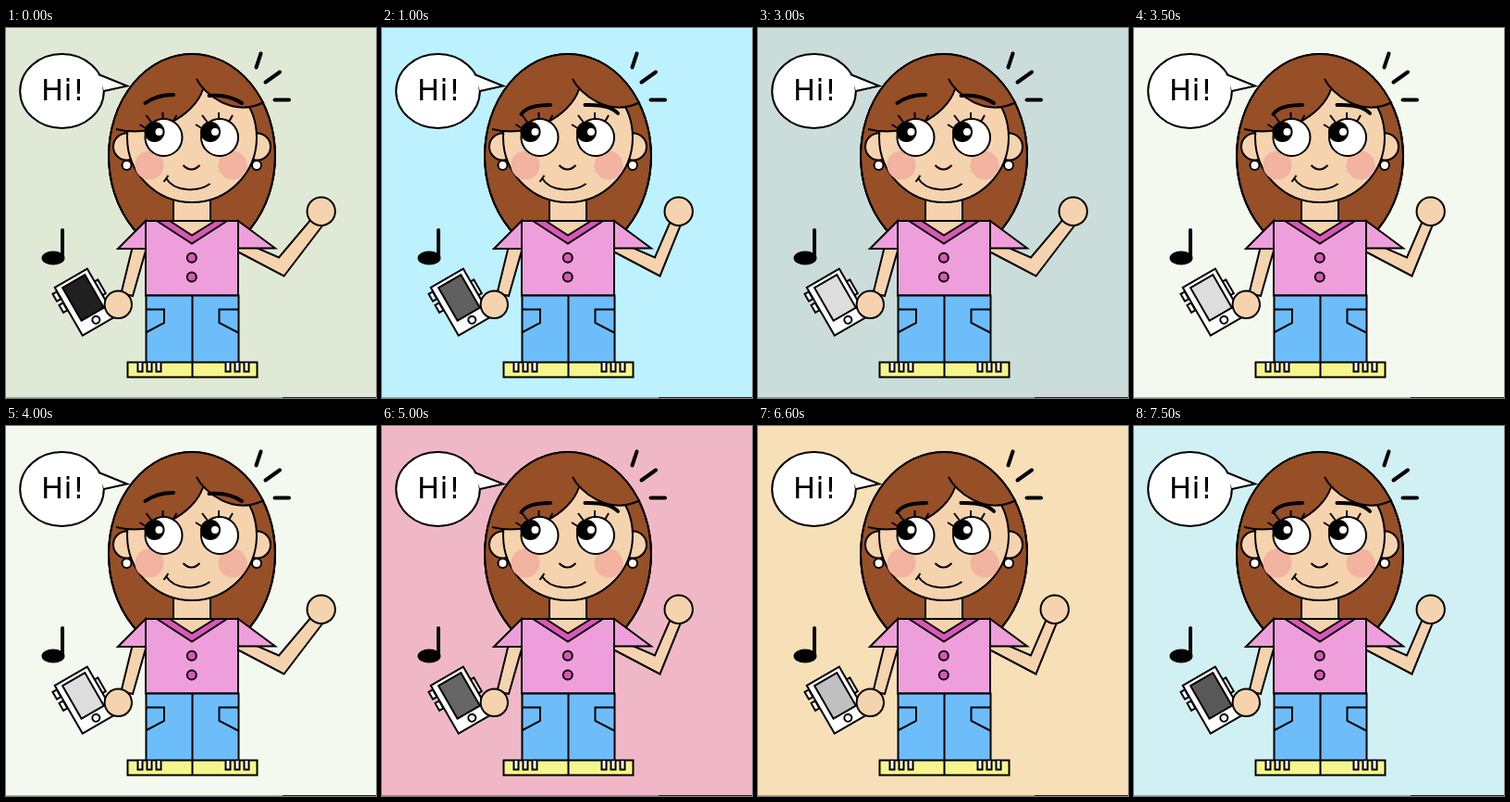
An HTML page for the animation above (8000 ms loop, 400x399 px).

```html
<!DOCTYPE html>
<html lang="en">
<head>
<meta charset="utf-8">
<title>Waving girl</title>
<style>
  html, body { margin: 0; width: 100%; height: 100%; overflow: hidden; }
  svg { display: block; width: 100vw; height: 100vh; }
  .line { fill: none; }
  .bold { fill: none; stroke-width: 4; stroke-linecap: round; }
  .skin { fill: #f4d3ae; }
  .hair { fill: #964f26; }
  .white { fill: #fff; }
  .ink { fill: #000; stroke: none; }
  .shirt { fill: #ee9fdb; }
  .trim { fill: #d957b8; }
  .jeans { fill: #6dbdfa; }
  .shoe { fill: #f5f58d; }
  .shine { fill: #fff; stroke: none; }
  .blush { fill: #f2b3a0; stroke: none; }
</style>
</head>
<body>
<svg viewBox="0 0 400 399" preserveAspectRatio="none" stroke="#000" stroke-width="2">
  <defs>
    <clipPath id="hairClip"><ellipse cx="201" cy="138" rx="90" ry="110"/></clipPath>
    <g id="eye">
      <circle class="white" r="20"/>
      <circle class="ink" cx="-10" cy="-6" r="11"/>
      <circle class="shine" cx="-5" cy="-6" r="4"/>
      <path class="line" d="M-26 -14L-18 -9M-19 -24L-13 -16M-1 -27V-20M14 -24L10 -17"/>
    </g>
    <path id="laces" d="M0 361v9.500h5v-9.500M10 361v9.500h5v-9.500M20 361v9.500h5v-9.500"/>
  </defs>

  <rect id="back" width="400" height="399" stroke="none"/>
  <path d="M0 398.500H300" stroke-opacity=".3" stroke-width="1"/>
  <path d="M299 398.500H400" stroke="#222" stroke-width="1"/>

  <!-- speech bubble, note and accent marks -->
  <ellipse class="white" cx="60.500" cy="68" rx="45.300" ry="40"/>
  <path class="white" d="M100 50L131 62.500L106 68"/>
  <text x="38" y="78" font-size="32" letter-spacing=".5" font-family="'DejaVu Sans', sans-serif" fill="#000" stroke="none">Hi!</text>
  <path class="bold" d="M275.500 27.500L270.500 42.500M296 47.500L280.500 58.500M290.500 77.500H306M61 218V247"/>
  <ellipse class="ink" cx="51" cy="248" rx="12.500" ry="7.500"/>

  <!-- head -->
  <ellipse class="hair" cx="201" cy="138" rx="90" ry="110"/>
  <rect class="skin" x="181" y="175" width="40" height="33"/>
  <circle class="skin" cx="130.500" cy="128" r="14.500"/>
  <circle class="skin" cx="271.500" cy="128" r="14.500"/>
  <circle class="skin" cx="201" cy="118" r="70"/>
  <path class="hair" clip-path="url(#hairClip)" stroke="none"
    d="M119 109C158 119 203 96 213 66L206 55C214 71 245 97 279 80L290 20H100Z"/>
  <path class="line" d="M119 109C158 119 203 96 213 66M206 55C214 71 245 97 279 80"/>
  <ellipse class="line" cx="201" cy="138" rx="90" ry="110"/>
  <circle class="white" cx="130.500" cy="148" r="5"/>
  <circle class="white" cx="271" cy="148" r="5"/>
  <circle class="blush" cx="155" cy="148" r="15.500"/>
  <circle class="blush" cx="245" cy="148" r="15.500"/>
  <use href="#eye" x="170.500" y="118"/>
  <use href="#eye" x="231" y="118"/>
  <path class="line" d="M191.500 148Q200.500 157 209.500 148M173 162C182 177 208 177 220.500 168M170.500 166L175.500 159"/>
  <path id="brows" class="bold"/>

  <!-- arms and body -->
  <path class="skin" d="M137 235H151V240L137 289L124.500 286Z"/>
  <path id="arm" class="skin"/>
  <circle id="hand" class="skin" cy="197.700" r="15.200"/>
  <path class="shirt" d="M151 208L121 238H151ZM251 208L291 237.500H251Z"/>
  <rect class="shirt" x="151" y="208" width="100" height="80.500"/>
  <path class="trim" d="M163 208L201 232.500L239 208Z"/>
  <path class="skin" d="M177 208L201 223.500L226 208Z"/>
  <circle class="trim" cx="200.800" cy="247.700" r="5"/>
  <circle class="trim" cx="200.800" cy="268.500" r="5"/>
  <rect class="jeans" x="151.500" y="288.500" width="100" height="72.500"/>
  <path class="line" d="M201.500 289V361M151 303.500H171V318L151 328.500M251 303.500H230.500V318L251 328.500"/>
  <path class="shoe" d="M131.500 360.500H271.500V376.500H131.500ZM201.500 360.500V376.500"/>
  <use href="#laces" class="white" x="142.500"/>
  <use href="#laces" class="white" x="237.500"/>

  <!-- phone -->
  <g class="white" transform="translate(85.500 295.500) rotate(-30)">
    <path d="M-26 -25h5v9h-5zM-26 -11h5v9h-5zM20 -14h4v17h-4z"/>
    <rect x="-20.500" y="-30" width="40.500" height="60"/>
    <rect id="screen" x="-13.500" y="-25.500" width="28" height="41"/>
    <circle cx=".6" cy="22.600" r="4"/>
  </g>
  <circle class="skin" cx="121.300" cy="298.300" r="14.700"/>
</svg>

<script>
const LOOP = 8000, TICK = 100;

// Each fade: start, end, backdrop reached, screen grey reached
const first = { color: [224, 233, 214], grey: 32 };
const fades = [
  [0, 700, [189, 241, 254], 96],
  [1200, 1500, [196, 231, 237], 159],
  [2500, 2700, [202, 221, 219], 221],
  [3200, 3500, [243, 249, 238], 221],
  [4400, 4700, [240, 184, 199], 102],
  [5200, 5500, [244, 208, 188], 150],
  [6400, 6700, [249, 231, 181], 213],
  [7200, 7500, [209, 240, 243], 88]
];

const poses = [
  {
    brows: 'M150.500 81Q163 72 181 72M219.500 73Q240 71 255 81',
    arm: 'M252 236L271 237L295 247.500L330 206L343 212L300.500 267.500L252 242',
    hand: 340.700
  },
  {
    brows: 'M150.500 93Q157 83 182 83M219.500 83Q246 82 255 92',
    arm: 'M252 236L271 237L295 247.500L312 208L323 212L300.500 267.500L252 242',
    hand: 320.700
  }
];
const toggles = [1000, 1500, 2000, 3000, 3500];

const [back, screen, brows, arm, hand] =
  ['back', 'screen', 'brows', 'arm', 'hand'].map(id => document.getElementById(id));

const mix = (a, b, k) => a + (b - a) * k;
const rgb = c => `rgb(${c.map(Math.round).join(',')})`;

function draw(time) {
  const t = Math.floor((time % LOOP) / TICK) * TICK;

  let { color, grey } = first;
  for (const [start, end, nextColor, nextGrey] of fades) {
    const k = Math.min(1, Math.max(0, (t - start) / (end - start)));
    color = color.map((v, i) => mix(v, nextColor[i], k));
    grey = mix(grey, nextGrey, k);
  }
  back.setAttribute('fill', rgb(color));
  screen.setAttribute('fill', rgb([grey, grey, grey]));

  const pose = poses[toggles.filter(s => s <= t % 4000).length % 2];
  brows.setAttribute('d', pose.brows);
  arm.setAttribute('d', pose.arm);
  hand.setAttribute('cx', pose.hand);
}

const begin = performance.now();
function loop() {
  draw(performance.now() - begin);
  requestAnimationFrame(loop);
}
loop();
</script>
</body>
</html>
```
